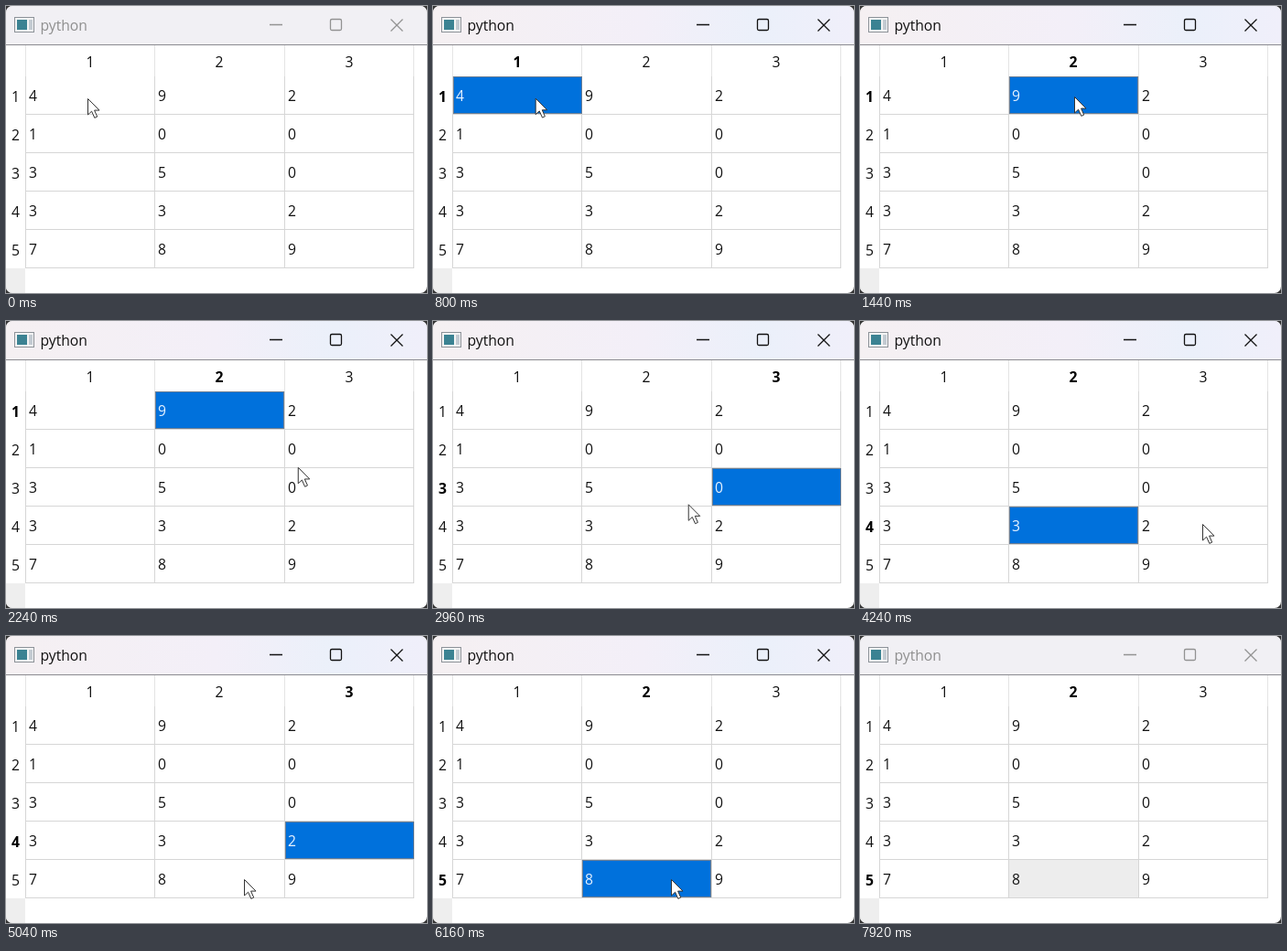
An HTML page for the animation above (8000 ms loop, 460 px wide and 314 px high).

```html
<!DOCTYPE html>
<html lang="en">
<head>
<meta charset="utf-8">
<title>python</title>
<style>
  html, body { margin: 0; width: 100%; height: 100%; overflow: hidden; background: #333; }
  svg { display: block; width: 460px; height: 314px; }
  text { font: 15.7px "Open Sans", "Noto Sans", sans-serif; fill: #111; }
  .bold { font-weight: 700; fill: #000; }
  .chrome { fill: none; stroke: #111; stroke-width: 1.3; }
  .inactive .chrome { stroke: #929292; }
  .inactive #title { fill: #8f8f8f; }
</style>
</head>
<body>
<svg id="stage" viewBox="0 0 460 314">
  <defs>
    <linearGradient id="mica">
      <stop offset="0" stop-color="#f5f0f2"/>
      <stop offset=".5" stop-color="#f3eff8"/>
      <stop offset=".78" stop-color="#ebf0fa"/>
      <stop offset="1" stop-color="#f0effa"/>
    </linearGradient>
    <clipPath id="frame"><rect width="460" height="314" rx="7"/></clipPath>
  </defs>
  <g clip-path="url(#frame)">
    <rect width="460" height="314" fill="#fff"/>
    <rect id="bar" width="460" height="42"/>
    <path d="M0 42.5H460" stroke="#8b8b90"/>
    <rect x="9.5" y="12.5" width="21" height="16" fill="#f4f4f4" stroke="#8c9298"/>
    <rect x="12" y="15" width="11" height="11" fill="#3b8292"/>
    <rect x="25" y="15" width="4" height="11" fill="#c3cbd2"/>
    <text id="title" x="37.5" y="27">python</text>
    <path class="chrome" d="M288 20.5H302M420.5 14.5L433.5 27.5M433.5 14.5L420.5 27.5"/>
    <rect class="chrome" x="354.5" y="14.5" width="12" height="12" rx="1.5"/>
    <rect y="287" width="21" height="27" fill="#eee"/>
    <path id="separators" stroke="#e4e4e4"/>
    <path id="grid" stroke="#d6d6d6"/>
    <g id="selection">
      <rect id="fill" width="141" height="41"/>
      <rect id="focus" x=".5" y=".5" width="140" height="40" fill="none" stroke="#d48a4c" stroke-dasharray="1 1"/>
    </g>
    <g id="labels"></g>
    <path id="cursor" d="M.5 .5V18L4.6 14.2L7.8 21.4L10.7 20.1L7.6 13.1H13Z" fill="#fff" stroke="#333"/>
  </g>
</svg>
<script>
const LOOP = 8000, STEP = 80, TRAVEL = 640, SETTLE = 160;
const COL_W = 141.5, ROW_H = 42, LEFT = 22, TOP = 77;
const values = ["492", "100", "350", "332", "789"];
// time and place of each click; the last one lands outside the window
const clicks = [
  [400, 89, 101], [1440, 234, 99], [2640, 358, 188], [3360, 242, 206],
  [4400, 374, 222], [5200, 260, 266], [7680, 300, 330]
].map(([time, x, y]) => ({ time, x, y }));

const $ = id => document.getElementById(id);
const cellX = col => LEFT + Math.floor(col * COL_W);
const cellY = row => TOP + row * ROW_H;

function label(text, x, y, anchor = "start") {
  const node = document.createElementNS("http://www.w3.org/2000/svg", "text");
  node.textContent = text;
  node.setAttribute("x", x);
  node.setAttribute("y", y);
  node.setAttribute("text-anchor", anchor);
  return $("labels").appendChild(node);
}

const edges = [0, 1, 2, 3].map(c => cellX(c) - .5);
$("separators").setAttribute("d", edges.map(x => `M${x} 43V${TOP}`).join(""));
$("grid").setAttribute("d", edges.map(x => `M${x} ${TOP}V287`).join("") +
  values.map((_, r) => `M21 ${cellY(r + 1) - .5}H446`).join(""));

const colHeads = [0, 1, 2].map(c => label(c + 1, cellX(c) + 70, 66.5, "middle"));
const rowHeads = values.map((_, r) => label(r + 1, 10.5, cellY(r) + 28, "middle"));
const cells = values.map((row, r) => [...row].map((v, c) => label(v, cellX(c) + 3, cellY(r) + 27)));

// The pointer glides to each place and rests shortly before clicking.
function pointer(t) {
  const i = Math.max(1, clicks.findLastIndex(c => t >= c.time - SETTLE - TRAVEL));
  const from = clicks[i - 1], to = clicks[i];
  const k = Math.min(1, Math.max(0, (t - to.time + SETTLE + TRAVEL) / TRAVEL));
  const e = k * k * (3 - 2 * k);
  return [from.x + (to.x - from.x) * e, from.y + (to.y - from.y) * e];
}

function draw(t) {
  const done = clicks.filter(c => c.time <= t);
  const active = done.length > 0 && done.length < clicks.length;
  const hit = done[Math.min(done.length, clicks.length - 1) - 1];
  const col = hit ? Math.floor((hit.x - LEFT) / COL_W) : -1;
  const row = hit ? Math.floor((hit.y - TOP) / ROW_H) : -1;
  $("stage").classList.toggle("inactive", !active);
  $("bar").setAttribute("fill", active ? "url(#mica)" : "#f1f0f4");
  $("selection").setAttribute("visibility", hit ? "visible" : "hidden");
  $("selection").setAttribute("transform", `translate(${cellX(col)} ${cellY(row)})`);
  $("fill").setAttribute("fill", active ? "#0071dc" : "#ededed");
  $("focus").style.display = active ? "" : "none";
  colHeads.forEach((n, c) => n.classList.toggle("bold", c === col));
  rowHeads.forEach((n, r) => n.classList.toggle("bold", r === row));
  cells.forEach((line, r) => line.forEach((n, c) => {
    n.style.fill = active && r === row && c === col ? "#e8f3ff" : "";
  }));
  $("cursor").setAttribute("transform", `translate(${pointer(t)})`);
}

function tick() {
  draw(Math.floor(performance.now() % LOOP / STEP) * STEP);
  requestAnimationFrame(tick);
}
tick();
</script>
</body>
</html>
```
